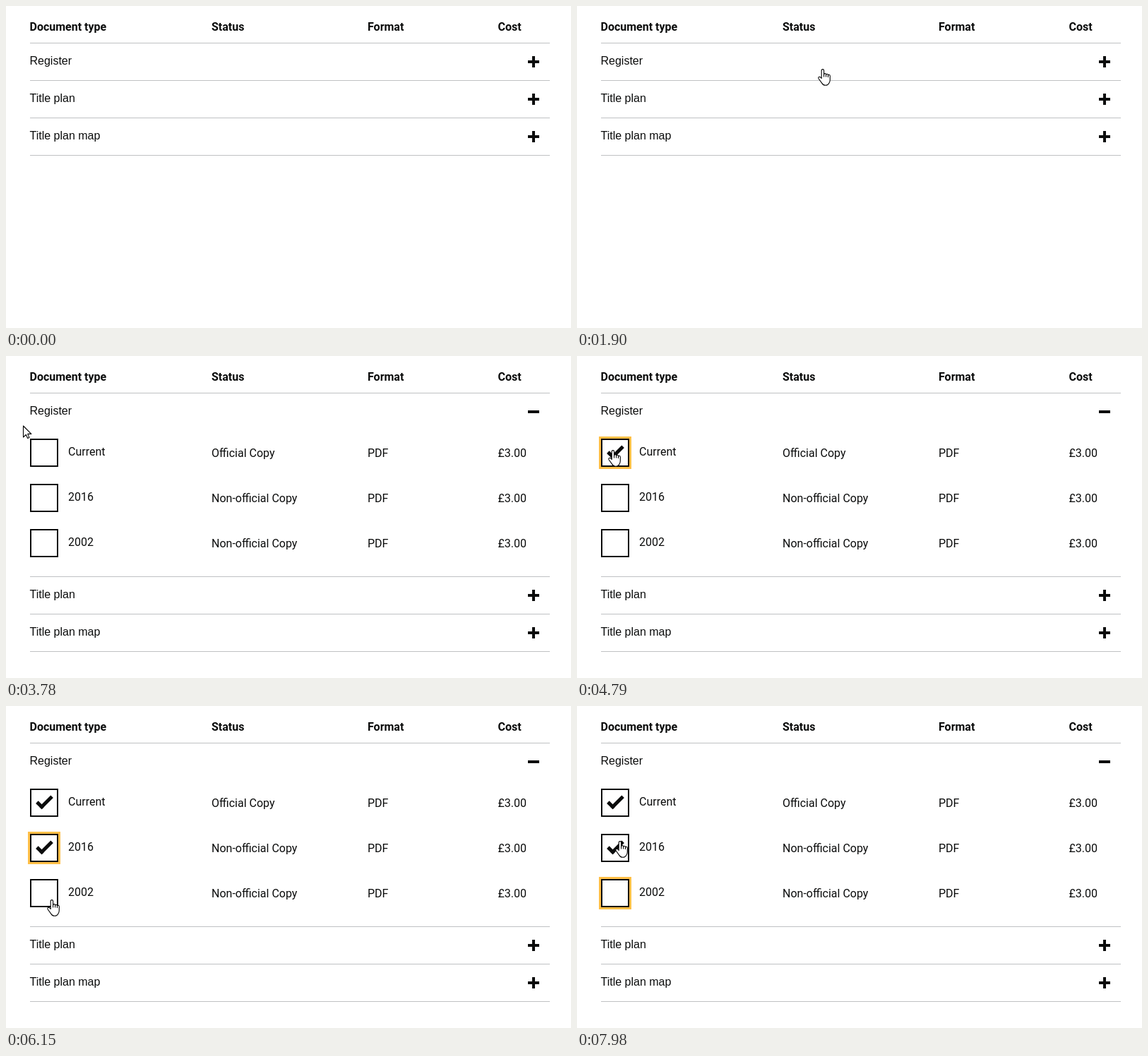
An HTML page with a canvas that plays this animation: 800x456 px, repeating every 8 s.

```html
<!DOCTYPE html>
<html lang="en">
<head>
<meta charset="utf-8">
<title>Document picker</title>
<style>
html, body { margin: 0; width: 100%; height: 100%; overflow: hidden; background: #fff; }
canvas { display: block; width: 800px; height: 456px; }
</style>
</head>
<body>
<canvas id="stage"></canvas>
<script>
const LOOP = 8000, W = 800, H = 456;
const INK = '#0b0c0c', RULE = '#bfc1c3', FOCUS = '#ffbf47', HOVER = '#f8f8f8';
const LEFT = 34, RIGHT = 770;
const COLS = [33.5, 291, 512, 696.5];
const BOX_TOP = [117, 181, 245];
const BOLD = '700 16px Roboto, sans-serif';
const BODY = '400 16px Roboto, sans-serif';
const TITLE = '400 16px "Liberation Sans", Arial, sans-serif';

const canvas = document.getElementById('stage');
const ctx = canvas.getContext('2d');
const dpr = window.devicePixelRatio || 1;
canvas.width = W * dpr;
canvas.height = H * dpr;

const smooth = u => u * u * (3 - 2 * u);
const easeOut = u => 1 - (1 - u) ** 2;

// Pointer tip: time, x, y and the easing used to get there
const PATH = [
  [1220, 328, 428],
  [1900, 348, 89, easeOut],
  [3010, 348, 89],
  [3420, 25, 98, smooth],
  [3779, 25, 98],
  [3780, 24, 98],
  [4220, 48, 131, smooth],
  [4789, 48, 131],
  [4790, 51, 133],
  [5160, 67, 217, smooth],
  [5380, 60, 195, smooth],
  [5790, 60, 195],
  [6150, 65, 274, smooth],
  [6330, 64, 273, smooth],
  [6640, 64, 273],
  [6840, 119, 276, smooth],
  [7380, 119, 276],
  [7980, 61, 191, smooth]
];

function pointerAt(t) {
  const next = PATH.findIndex(p => p[0] > t);
  if (next === 0) return null;
  if (next < 0) return PATH[PATH.length - 1].slice(1, 3);
  const [t0, x0, y0] = PATH[next - 1];
  const [t1, x1, y1, ease] = PATH[next];
  const u = (t - t0) / (t1 - t0);
  const k = ease ? ease(u) : u;
  return [Math.round(x0 + (x1 - x0) * k), Math.round(y0 + (y1 - y0) * k)];
}

function stateAt(t) {
  return {
    open: t >= 2340,
    rowFocus: t >= 2260 && t < 3780,
    boxFocus: t >= 6570 ? 2 : t >= 5610 ? 1 : t >= 4400 ? 0 : -1,
    checked: [t >= 4460, t >= 5650, t >= 6630 && t < 7380]
  };
}

function text(str, x, y, font) {
  ctx.font = font;
  ctx.fillText(str, x, y);
}

function rect(x, y, w, h, color) {
  ctx.fillStyle = color;
  ctx.fillRect(x, y, w, h);
}

function frame(x, y, w, h, line, color) {
  ctx.strokeStyle = color;
  ctx.lineWidth = line;
  ctx.strokeRect(x + line / 2, y + line / 2, w - line, h - line);
}

const rule = y => rect(LEFT, y, RIGHT - LEFT, 1, RULE);

function section(title, top, open) {
  ctx.fillStyle = INK;
  text(title, COLS[0], top + 31, TITLE);
  ctx.fillRect(739, top + 25, 16, 4);
  if (!open) ctx.fillRect(745, top + 19, 4, 16);
}

function tick(top) {
  ctx.save();
  ctx.translate(54.5, top + 17);
  ctx.rotate(-Math.PI / 4);
  rect(-11.5, -6, 5, 12, INK);
  rect(-11.5, 1, 23, 5, INK);
  ctx.restore();
}

function item(i, state) {
  const top = BOX_TOP[i];
  if (state.boxFocus === i) frame(31, top - 3, 46, 46, 3, FOCUS);
  frame(LEFT, top, 40, 40, 2, INK);
  if (state.checked[i]) tick(top);
  ctx.fillStyle = INK;
  text(['Current', '2016', '2002'][i], 88, top + 24, BODY);
  text(i ? 'Non-official Copy' : 'Official Copy', COLS[1], top + 26, BODY);
  text('PDF', COLS[2], top + 26, BODY);
  text('£3.00', COLS[3], top + 26, BODY);
}

const ARROW = new Path2D('M.5 1V17L4.3 13.4 6.7 18.6 9 17.6 6.7 12.4H11.8Z');
const HAND = new Path2D(
  'M5.2 13.5V2.5Q5.2.6 6.9.6T8.6 2.5V8Q8.7 6.6 10.2 6.6T11.6 8.3' +
  'Q11.8 7.2 13.1 7.2T14.5 9Q14.7 8.2 15.9 8.2T17.3 10V15.5' +
  'Q17.3 18 16 20Q14.4 23.3 10.8 23.3Q7.6 23.3 6 20.6L1.2 14' +
  'Q.2 12.3 1.5 11.4Q3 10.6 5.2 13.5Z');
const KNUCKLES = new Path2D('M8.6 8V11.5M11.6 8.3V11.5M14.5 9V12');

function clickable(x, y, open) {
  if (x < LEFT || x > RIGHT) return false;
  if (!open) return y >= 52 && y < 211;
  return y < 105 || (x < 139 && BOX_TOP.some(top => y >= top && y < top + 40));
}

function pointer([x, y], open) {
  const hand = clickable(x, y, open);
  ctx.save();
  ctx.translate(hand ? x - 7 : x, y);
  ctx.fillStyle = '#fff';
  ctx.strokeStyle = '#000';
  ctx.lineWidth = 1.1;
  ctx.lineJoin = 'round';
  ctx.fill(hand ? HAND : ARROW);
  ctx.stroke(hand ? HAND : ARROW);
  if (hand) ctx.stroke(KNUCKLES);
  ctx.restore();
}

function draw(t) {
  const state = stateAt(t);
  const shift = state.open ? 207 : 0;
  ctx.setTransform(dpr, 0, 0, dpr, 0, 0);
  rect(0, 0, W, H, '#fff');

  ctx.fillStyle = INK;
  ['Document type', 'Status', 'Format', 'Cost'].forEach((s, i) => text(s, COLS[i], 35, BOLD));

  rule(52);
  [105, 158, 211].forEach(y => rule(y + shift));
  if (state.rowFocus) {
    rect(LEFT, 53, RIGHT - LEFT, 18, HOVER);
    frame(31, 50, 742, 58, 3, FOCUS);
  }
  section('Register', 52, state.open);
  section('Title plan', 105 + shift, false);
  section('Title plan map', 158 + shift, false);
  if (state.open) BOX_TOP.forEach((_, i) => item(i, state));

  const tip = pointerAt(t);
  if (tip) pointer(tip, state.open);
}

const start = performance.now();
function tickFrame() {
  draw((performance.now() - start) % LOOP);
  requestAnimationFrame(tickFrame);
}
tickFrame();
</script>
</body>
</html>
```
